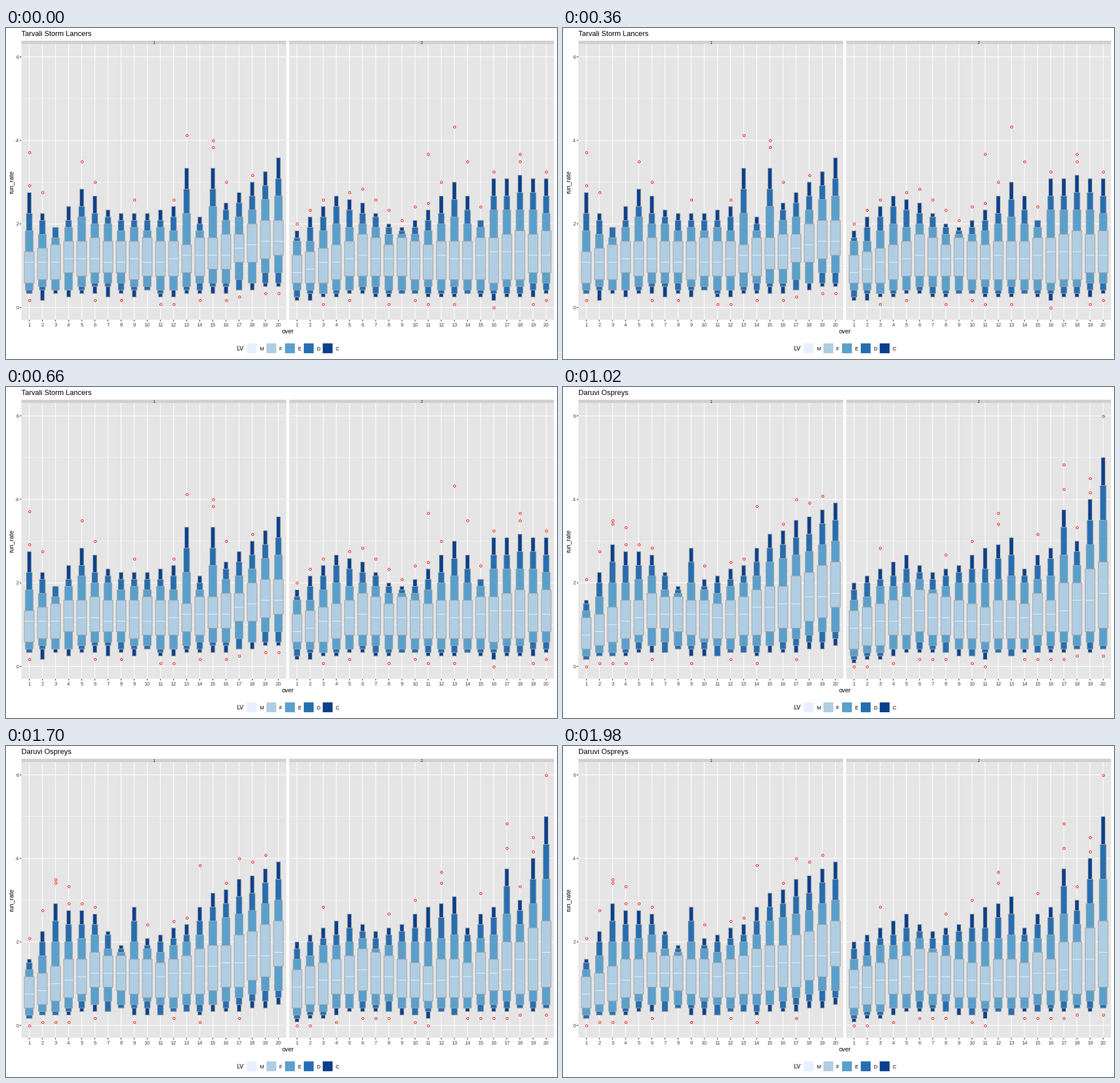
Animation, 966 px wide and 580 px high, one loop 2 s. Source, as a matplotlib script:

```python
import matplotlib.pyplot as plt
import numpy as np
from matplotlib.animation import FuncAnimation
from matplotlib.collections import LineCollection, PolyCollection
from matplotlib.patches import Rectangle

W, H, DPI = 966, 580, 100
PT = 72 / DPI  # points per pixel
STEP_MS, FRAMES, SWITCH_MS = 20, 100, 1020

PANEL_LEFT, PANEL_WIDTH = (27.0, 496.4), 464.4
TOP, BOTTOM, STRIP_TOP = 28, 511.3, 22.3
SPACING = PANEL_WIDTH / 20.2
Y_ZERO, Y_UNIT = 489.6, 73.17
KEY_SIZE = 17.28
FILLS = {"M": "#e8f0ff", "F": "#b0cde2", "E": "#5aa0cc",
         "D": "#266eb2", "C": "#0a3f8c"}
EDGE = "#a6a6a6"

OVERS = np.arange(1, 21)
KEY_OVERS = (1, 6, 11, 16, 20)
LOW_RATIOS = (0.4, 0.52, 0.65, 1)   # C, D, E, F lows, relative to the F low
HIGH_RATIOS = (0, 0.4, 0.72, 1)     # F, E, D, C highs, from F high up to top

plt.rcParams["font.family"] = "Liberation Sans"
fig = plt.figure(figsize=(W / DPI, H / DPI), dpi=DPI, facecolor="white")
ax = fig.add_axes([0, 0, 1, 1])
ax.set_xlim(0, W)
ax.set_ylim(H, 0)
ax.axis("off")


def y_px(rate):
    return Y_ZERO - Y_UNIT * rate


def x_px(inning, over):
    return PANEL_LEFT[inning] + SPACING * (over - 0.4)


def label(x, y, text, size, color="black", **kw):
    return ax.text(x, y, text, fontsize=size * PT, color=color,
                   va="baseline", **kw)


def block(x, y, w, h, color):
    ax.add_patch(Rectangle((x, y), w, h, fc=color, ec="none", lw=0,
                           zorder=0, snap=False))


def lines(segments, color, width, zorder=1):
    group = LineCollection(segments, colors=color, linewidths=width * PT,
                           capstyle="butt", zorder=zorder, snap=False)
    return ax.add_collection(group, autolim=False)


def draw_background():
    for i, left in enumerate(PANEL_LEFT):
        right = left + PANEL_WIDTH
        block(left, STRIP_TOP, PANEL_WIDTH, TOP - STRIP_TOP, "#d0d0d0")
        block(left, TOP, PANEL_WIDTH, BOTTOM - TOP, "#e5e5e5")
        label(left + PANEL_WIDTH / 2, 28, str(i + 1), 7, "#1a1a1a", ha="center")

        def rows(rates):
            return [[(left, y_px(r)), (right, y_px(r))] for r in rates]

        xs = x_px(i, OVERS)
        lines(rows((1, 3, 5)), "white", 0.6)
        lines(rows((0, 2, 4, 6)), "white", 1.15)
        lines([[(x, TOP), (x, BOTTOM)] for x in xs], "white", 1.15)
        lines([[(x, BOTTOM), (x, BOTTOM + 3)] for x in xs], "#333333", 1.1)
        for over, x in zip(OVERS, xs):
            label(x, 523.2, str(over), 9, "#454545", ha="center")

    for r in (0, 2, 4, 6):
        label(22.3, y_px(r) + 3.2, str(r), 9, "#454545", ha="right")
    lines([[(24, y_px(r)), (27, y_px(r))] for r in (0, 2, 4, 6)], "#333333", 1.1)

    label(494, 535.4, "over", 10.7, ha="center")
    label(13, 270, "run_rate", 10.7, ha="center", rotation=90,
          rotation_mode="anchor")
    label(404, 565.3, "LV", 10.7)
    for key, x, text_x in zip("MFEDC", (422.2, 456.6, 489.2, 522.1, 555.3),
                              (444, 478.3, 511, 544, 577.3)):
        block(x, 552.6, KEY_SIZE, KEY_SIZE, FILLS[key])
        label(text_x, 564.6, key, 8.8)


def letter_values(rng, box_low, median, box_high, top):
    """Nine rows from C low to C high, one column per over."""
    low, mid, high = (np.interp(OVERS, KEY_OVERS, curve)
                      for curve in (box_low, median, box_high))
    peak = np.interp(OVERS, list(top), list(top.values()))
    rows = np.array([low * ratio for ratio in LOW_RATIOS] + [mid]
                    + [high + (peak - high) * ratio for ratio in HIGH_RATIOS])
    rows += rng.normal(0, 0.04, rows.shape)
    return np.sort(np.round(rows * 12) / 12, axis=0)


def pick_outliers(rng, levels, extremes):
    dots = list(extremes.items())
    for over, bottom, top in zip(OVERS, levels[0], levels[-1]):
        if rng.random() < 0.6:
            dots.append((over, top + rng.integers(1, 4) / 6))
        if rng.random() < 0.5:
            dots.append((over, max(0, bottom - 1 / 6)))
    return dots


def draw_innings(inning, seed, extremes, **curves):
    rng = np.random.default_rng(seed)
    levels = letter_values(rng, **curves)
    full = SPACING * 0.75 / 2
    polys, fills, medians = [], [], []
    for x, column in zip(x_px(inning, OVERS), levels.T):
        for depth, key in enumerate("CDEF"):
            half = full * (depth + 2) / 5
            low, high = y_px(column[depth]), y_px(column[-1 - depth])
            polys.append([(x - half, low), (x + half, low),
                          (x + half, high), (x - half, high)])
            fills.append(FILLS[key])
        y = y_px(column[4])
        medians.append([(x - full + 0.6, y), (x + full - 0.6, y)])

    boxes = PolyCollection(polys, facecolors=fills, edgecolors=EDGE,
                           linewidths=1.1 * PT, zorder=3, snap=False)
    ax.add_collection(boxes, autolim=False)
    dots = [(x_px(inning, over), y_px(rate))
            for over, rate in pick_outliers(rng, levels, extremes)]
    points, = ax.plot(*zip(*dots), "o", mfc="none", mec="red", ms=4 * PT,
                      mew=0.9 * PT, zorder=5, snap=False)
    return [boxes, lines(medians, FILLS["M"], 1.1, 4), points]


draw_background()

lancers = draw_innings(
    0, seed=3,
    box_low=(0.65, 0.85, 0.7, 0.92, 1.3),
    median=(1, 1.17, 1.1, 1.35, 1.6),
    box_high=(1.35, 1.65, 1.5, 1.75, 2.17),
    top={1: 2.7, 3: 1.9, 5: 2.8, 8: 2.2, 12: 2.35, 13: 3.3, 14: 2.2,
         15: 3.3, 16: 2.5, 18: 3, 20: 3.5},
    extremes={1: 3.71, 5: 3.5, 13: 4.12, 15: 4})
lancers += draw_innings(
    1, seed=5,
    box_low=(0.55, 0.75, 0.67, 0.67, 0.82),
    median=(0.9, 1.25, 1.15, 1.33, 1.25),
    box_high=(1.3, 1.67, 1.5, 1.7, 1.8),
    top={1: 1.8, 4: 2.7, 6: 2.5, 8: 2, 10: 2, 13: 3, 15: 2.2, 16: 3.1, 20: 3.1},
    extremes={11: 3.67, 13: 4.33, 14: 3.5, 18: 3.5})

ospreys = draw_innings(
    0, seed=7,
    box_low=(0.4, 0.9, 0.67, 0.85, 1.33),
    median=(0.75, 1.3, 1.17, 1.5, 1.85),
    box_high=(1.2, 1.75, 1.5, 2, 2.5),
    top={1: 1.6, 3: 2.9, 6: 2.7, 8: 1.9, 9: 2.8, 10: 2.1, 13: 2.4,
         15: 3.2, 20: 3.9},
    extremes={3: 3.5, 4: 3.33, 14: 3.83, 17: 4})
ospreys += draw_innings(
    1, seed=9,
    box_low=(0.37, 0.85, 0.6, 0.83, 0.85),
    median=(0.9, 1.25, 1, 1.25, 1.7),
    box_high=(1.33, 1.75, 1.45, 1.7, 2.5),
    top={1: 2, 5: 2.67, 7: 2.2, 13: 3.1, 14: 2.4, 16: 2.8, 17: 3.8,
         18: 3, 20: 5},
    extremes={12: 3.67, 17: 4.83, 19: 4.5, 20: 6})

TEAMS = (("Tarvali Storm Lancers", lancers), ("Daruvi Ospreys", ospreys))
title = label(27, 14.4, "", 12.7)


def update(frame):
    shown = int(frame * STEP_MS >= SWITCH_MS)
    title.set_text(TEAMS[shown][0])
    for i, (_, artists) in enumerate(TEAMS):
        for artist in artists:
            artist.set_visible(i == shown)
    return []


anim = FuncAnimation(fig, update, frames=FRAMES, interval=STEP_MS,
                     init_func=lambda: update(0), repeat=True, repeat_delay=0)
plt.show()
```
